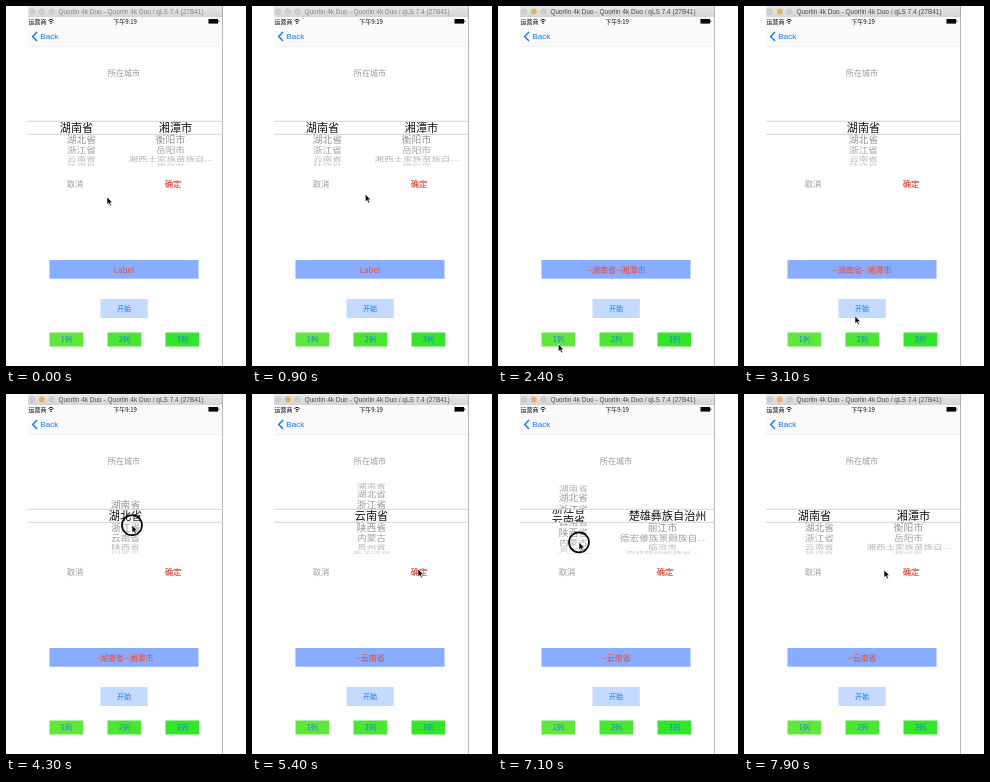
Write an HTML page that moves like this. It is 240x360 px and loops after 8 s.

```html
<!DOCTYPE html>
<html lang="zh">
<head>
<meta charset="utf-8">
<title>Picker</title>
<style>
html, body { margin: 0; width: 100%; height: 100%; overflow: hidden; background: #fff; }
svg { display: block; }
text { font-family: "Noto Sans CJK SC", "Noto Sans CJK", "Noto Sans", sans-serif; text-anchor: middle; white-space: pre; }
.latin { font-family: "Liberation Sans", sans-serif; }
</style>
</head>
<body>
<svg width="240" height="360" viewBox="0 0 240 360">
  <defs>
    <linearGradient id="bar" x1="0" y1="0" x2="0" y2="1">
      <stop offset="0" stop-color="#e9e9e9"/><stop offset="1" stop-color="#d4d4d4"/>
    </linearGradient>
    <clipPath id="wheel"><path d="M22 84H217V115H22ZM22 128.5H217V160H22Z"/></clipPath>
    <clipPath id="lens"><path d="M22 115.5H217V128.5H22Z"/></clipPath>
  </defs>
  <rect width="240" height="360" fill="#fff"/>
  <g id="page"></g>
  <g id="popup">
    <g id="fixed"></g>
    <g id="rows" clip-path="url(#wheel)" fill="#333"></g>
    <g id="front" clip-path="url(#lens)" fill="#111"></g>
    <path d="M22 115.3H217M22 128.3H217" stroke="#c8c8c8" stroke-width=".8"/>
  </g>
  <g id="pointer">
    <circle id="ring" r="10" fill="none" stroke="#000" stroke-width="1.7"/>
    <path d="M0 0V7.6L1.8 6L3 8.8L4.4 8.2L3.2 5.5H5.5Z" fill="#000" stroke="#fff" stroke-width=".6"/>
  </g>
</svg>
<script>
const LOOP = 8000, STEP = 100, MID = 119.5;
const $ = id => document.getElementById(id);

const provinces = ["湖南省", "湖北省", "浙江省", "云南省", "陕西省", "内蒙古", "贵州省", "黑龙江省"];
const hunan = ["湘潭市", "衡阳市", "岳阳市", "湘西土家族苗族自...", "郴州市"];
const yunnan = ["楚雄彝族自治州", "丽江市", "德宏傣族景颇族自...", "临沧市", "西双版纳傣族自..."];

const tabX = i => 60.3 + i * 58;
const ok = { x: 163, y: 177 }, go = { x: 111, y: 310 };
const tab = i => ({ x: tabX(i), y: 338 });

// The pointer visits these in turn, pressing and sometimes dragging.
const visits = [
  { at: { x: 101, y: 191 }, down: 0, up: 0 },
  { at: ok, down: 1500, up: 1700 },
  { at: tab(0), down: 2200, up: 2400 },
  { at: go, down: 2700, up: 2850 },
  { at: { x: 126, y: 144 }, down: 4100, up: 4600, drag: -32 },
  { at: { x: 166, y: 175 }, down: 5150, up: 5300 },
  { at: tab(1), down: 6000, up: 6150 },
  { at: go, down: 6450, up: 6600 },
  { at: { x: 81, y: 143 }, down: 7030, up: 7400, drag: 28 },
  { at: { x: 140, y: 176 }, down: LOOP, up: LOOP }
];
const [, ok1, tab1, go1, flick, ok2, tab2, go2, pull] = visits;

const ramp = (t, a, b) => Math.min(1, Math.max(0, (t - a) / (b - a)));
const smooth = u => u * u * (3 - 2 * u);
const coast = u => u * (1.4 - .4 * u);
const spin = (t, v) => coast(ramp(t, v.down, v.up + 300));
const fade = (t, v) => ramp(t, v.up, v.up + 200);

function pointerAt(t) {
  const n = visits.findIndex((v, i) => i && t < v.up + 100);
  const v = visits[n], p = visits[n - 1];
  const arrive = v.down - 100;
  const u = smooth(ramp(t, Math.max(p.up + 100, arrive - 700), arrive));
  const y0 = p.at.y + (p.drag || 0);
  return {
    x: p.at.x + (v.at.x - p.at.x) * u,
    y: y0 + (v.at.y - y0) * u + (v.drag || 0) * ramp(t, v.down, v.up),
    pressed: t >= v.down && t < v.up
  };
}

const text = (s, x, y, size, attrs = "") =>
  `<text x="${x}" y="${(y + size * .37).toFixed(2)}" font-size="${size}" ${attrs}>${s}</text>`;
const box = (x, y, w, h, fill) =>
  `<rect x="${x}" y="${y}" width="${w}" height="${h}" fill="${fill}"/>`;

function buildPage() {
  const each = f => [0, 1, 2].map(f).join("");
  const dots = each(i =>
    `<circle id="dot${i}" cx="${26 + i * 9.8}" cy="5.5" r="2.7" fill="#cfcfcf" stroke="#b4b4b4" stroke-width=".4"/>`);
  const tabs = each(i =>
    box(tabX(i) - 16.8, 326.5, 33.5, 14, `hsl(${107 + i * 5} 78% ${57 - i * 2}%)`) +
    text(i + 1 + "列", tabX(i), 333.6, 7.2, 'fill="#1679e8"'));
  $("page").innerHTML =
    box(22, 0, 195, 11, "url(#bar)") + dots +
    text("Quorlin 4k Duo - Quorlin 4k Duo / qLS 7.4 (27B41)", 125, 5.6, 6.5, 'id="title" class="latin"') +
    box(22, 11, 195, 30, "#fafafa") + box(22, 40.6, 195, .5, "#e4e4e4") +
    text("运营商", 31.5, 15.5, 6) +
    text("下午9:19", 119, 15.4, 6, 'font-weight="500"') +
    `<path d="M42.5 14.5Q45 12 47.5 14.5M43.6 16Q45 14.6 46.4 16" fill="none" stroke="#000" stroke-width=".9"/>
     <circle cx="45" cy="17.2" r=".7"/>` +
    box(202.5, 13, 9.5, 4.6, "#000") + box(212.4, 14.4, .8, 1.8, "#000") +
    `<path d="M31 26L26.7 30.5L31 35" fill="none" stroke="#0a78ff" stroke-width="1.4"/>` +
    text("Back", 43.3, 30.2, 8.1, 'class="latin" fill="#0a78ff"') +
    box(43.5, 254, 149, 18.7, "#88acff") +
    text("", 118, 263.8, 8, 'id="label" fill="#f0482f"') +
    box(94.5, 293, 47.3, 19, "#c5daff") + text("开始", 118, 302.4, 7.1, 'fill="#0a78ff"') +
    tabs + box(216.3, 0, .7, 360, "#9a9a9a");
  $("fixed").innerHTML =
    text("所在城市", 118, 66.6, 8.1, 'fill="#999" font-weight="300"') +
    text("取消", 69, 177.8, 8.3, 'fill="#999"') +
    text("确定", 167, 177.8, 8.3, 'fill="#d8200f" font-weight="500"');
}

// Rows sit on a cylinder seen in perspective; the centre band enlarges them.
function column(list, x, pos) {
  const far = MID + (x - MID) * .9;
  let rows = "", front = "";
  list.forEach((s, i) => {
    const d = i - pos, a = d * .297;
    if (Math.abs(a) < 1.4) {
      const c = Math.cos(a), y = 122 + 39.4 * Math.sin(a);
      rows += `<g transform="translate(${far} ${y}) scale(${.93 + .07 * c} ${c})" opacity="${.08 + .46 * c}">${text(s, 0, 0, 9.8)}</g>`;
    }
    if (Math.abs(d) < 1.3) front += text(s, x, 122 + d * 12, 11.1);
  });
  return { rows, front };
}

function labelAt(t) {
  if (t < ok1.up) return "Label";
  return t < ok2.up ? "--湖南省--湘潭市" : "--云南省";
}

function draw(t) {
  const pos = 3 * (spin(t, flick) - spin(t, pull));
  const single = t >= tab1.up && t < tab2.up;
  const cities = t >= tab2.up && t < pull.up + 300 ? yunnan : hunan;
  const cols = single
    ? [column(provinces, MID, pos)]
    : [column(provinces, 70.5, pos), column(cities, 169.5, 0)];
  $("rows").innerHTML = cols.map(c => c.rows).join("");
  $("front").innerHTML = cols.map(c => c.front).join("");

  // Dismissal starts a moment after the button is released.
  const late = t - 100;
  $("popup").setAttribute("opacity",
    1 - fade(late, ok1) + fade(t, go1) - fade(late, ok2) + fade(t, go2));
  $("label").textContent = labelAt(t);

  const active = t >= ok1.down;
  $("title").setAttribute("fill", active ? "#4c4c4c" : "#858585");
  $("dot1").setAttribute("fill", active ? "#f5ae45" : "#cfcfcf");

  const p = pointerAt(t);
  $("pointer").setAttribute("transform", `translate(${p.x} ${p.y})`);
  $("ring").setAttribute("visibility", p.pressed ? "visible" : "hidden");
}

buildPage();
const start = performance.now();
let last = -1;
function tick() {
  const t = Math.floor((performance.now() - start) % LOOP / STEP) * STEP;
  if (t !== last) draw(last = t);
  requestAnimationFrame(tick);
}
tick();
</script>
</body>
</html>
```
